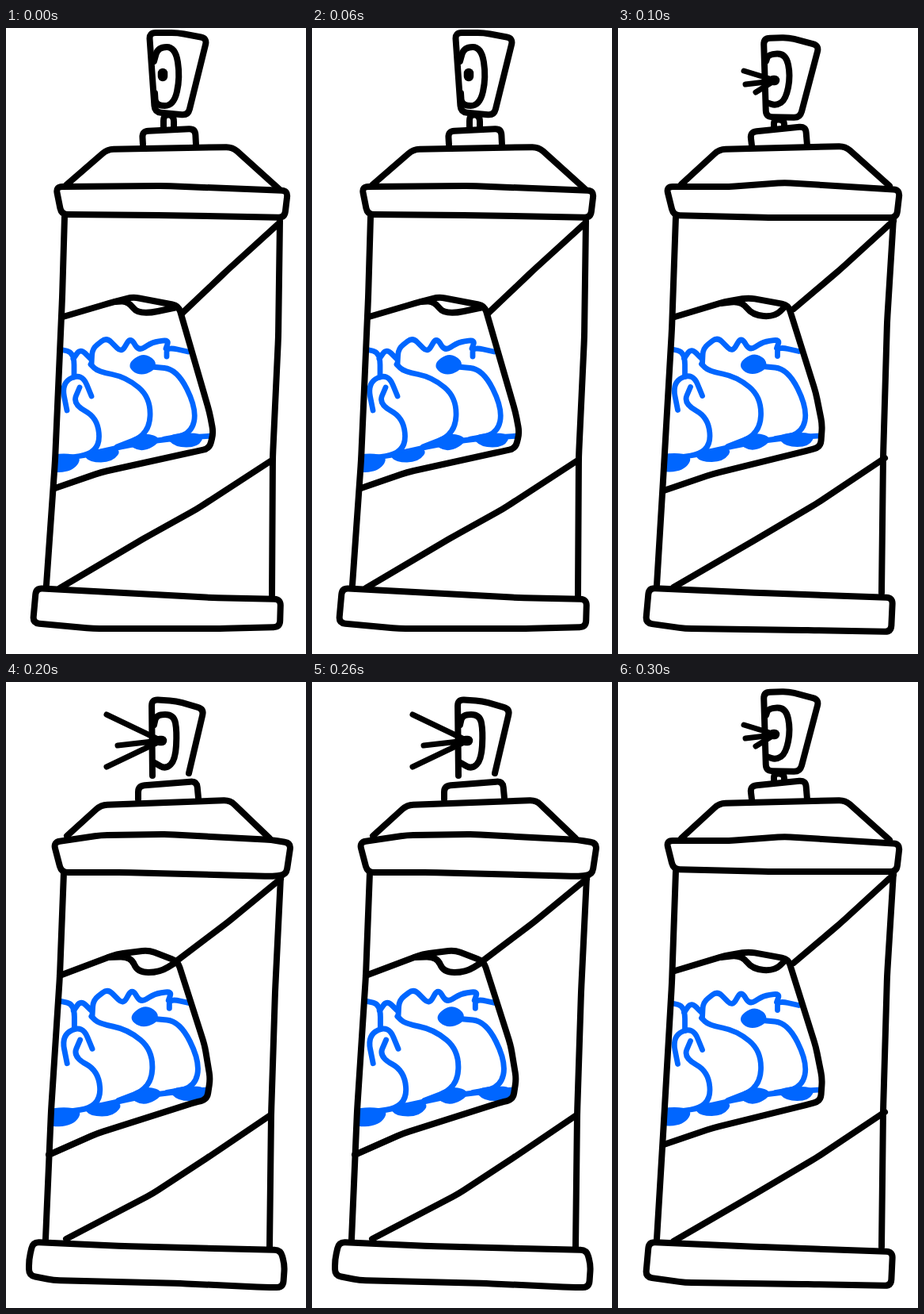
Recreate the animation shown at these times as an HTML page. Size 379x789 px, loop 400 ms.

```html
<!DOCTYPE html>
<html lang="en">
<head>
<meta charset="utf-8">
<title>Spray can</title>
<style>
  html, body { margin: 0; width: 100%; height: 100%; overflow: hidden; background: #fff; }
  svg { display: block; width: 100%; height: 100%; }
  path { stroke-linecap: round; stroke-linejoin: round; }
  .pose { fill: none; stroke: #000; stroke-width: 8; }
  .dot { stroke-width: 12.5; }
  .ray { stroke-width: 7; }
  #art { fill: none; stroke: #06f; stroke-width: 6.8; }
  #art .loop { fill: #06f; stroke-width: 3; }
</style>
</head>
<body>
<svg viewBox="0 0 379 789">
  <clipPath id="window"><path id="opening"/></clipPath>
  <g clip-path="url(#window)">
    <g id="art">
      <path class="soft" data-pts="68,405 86,409 86,440"/>
      <path class="soft" data-pts="85,417 94,404 106,416"/>
      <path data-pts="108,424 109,404 127,390 146,409 157,390 168,407 185,396 206,393 202,404"/>
      <path class="soft" data-pts="203,414 203,402 230,408"/>
      <path class="soft" data-pts="107,424 116,433 152,440 183,466 181,512 140,528"/>
      <path class="soft" data-pts="77,482 70,447 96,435 108,464"/>
      <path class="soft" data-pts="93,453 84,474 117,492 118,536 68,543"/>
      <path class="soft" data-pts="184,427 216,430 241,480 234,512 200,518"/>
      <path class="soft" data-pts="105,537 186,519 262,514"/>
      <path class="soft loop" data-pts="154,425 172,411 188,419 187,431 168,437"/>
      <path class="soft loop" data-pts="50,538 96,538 84,558 50,559"/>
      <path class="soft loop" data-pts="98,535 146,529 134,546 106,546"/>
      <path class="soft loop" data-pts="152,522 175,511 197,519 172,534"/>
      <path class="soft loop" data-pts="202,513 250,511 242,527 214,527"/>
    </g>
  </g>

  <g class="pose" data-art="translate(0)">
    <path class="loop" data-pts="181,6 217,6 254,13 230,110 188,106"/>
    <path class="soft" data-pts="187,42 192,24 214,24 220,62 212,98 189,98 188,82"/>
    <path class="dot" data-pts="198,57 198,61"/>
    <path data-pts="199,126 199,109 212,110 212,126"/>
    <path data-pts="173,147 172,130 239,127 240,147"/>
    <path data-pts="76,198 128,153 286,150 345,203"/>
    <path class="loop" data-pts="63,200 200,199 356,205 352,239 200,236 70,235"/>
    <path data-pts="74,238 71,340 62,545 51,702"/>
    <path data-pts="346,243 344,390 337,540 336,715"/>
    <path data-pts="345,246 280,305 222,360"/>
    <path class="label" data-pts="72,364 130,347 160,339 218,350 257,484 262,510 257,530 238,534 120,560 62,580"/>
    <path class="soft" data-pts="138,345 154,344 168,362 216,352"/>
    <path data-pts="68,706 180,640 240,607 334,546"/>
    <path class="loop" data-pts="38,706 260,718 347,720 346,755 270,757 110,757 34,750"/>
  </g>

  <g class="pose" data-art="translate(-1.5 -.5)">
    <path class="loop" data-pts="184,13 215,12 254,22 230,113 187,112"/>
    <path class="soft" data-pts="187,42 190,33 212,32 218,60 212,90 200,98 188,94"/>
    <path class="dot" data-pts="196,66 198,66"/>
    <path class="ray" d="M159 54L195 65M161 71L195 67M174 81L195 68"/>
    <path data-pts="197,126 197,115 210,116 210,126"/>
    <path data-pts="169,148 167,131 237,124 239,148"/>
    <path data-pts="80,197 128,153 287,149 343,199"/>
    <path class="loop" data-pts="61,200 140,200 210,195 356,204 352,239 190,239 70,236"/>
    <path data-pts="73,238 68,380 57,570 49,702"/>
    <path data-pts="348,240 340,370 335,540 333,712"/>
    <path data-pts="348,243 280,305 222,354"/>
    <path class="label" data-pts="72,364 135,345 165,340 215,349 250,460 258,500 256,528 238,533 120,562 58,583"/>
    <path class="soft" data-pts="130,347 156,344 170,362 198,364 212,350"/>
    <path data-pts="70,705 165,650 250,600 337,542"/>
    <path class="loop" data-pts="39,706 180,712 347,718 345,761 240,759 85,757 35,750"/>
  </g>

  <g class="pose" data-art="matrix(1.025 0 0 1.02 -1.75 -11)">
    <path data-pts="185,118 184,22 215,24 250,34 231,115"/>
    <path class="soft" data-pts="187,54 190,41 212,41 216,62 214,98 202,110 188,102"/>
    <path class="dot" data-pts="194,74 197,74"/>
    <path class="ray" d="M127 41L194 73M141 80L194 74M127 107L194 75"/>
    <path data-pts="167,148 167,131 241,125 243,146"/>
    <path data-pts="77,194 120,155 283,149 333,197"/>
    <path class="loop" data-pts="60,202 120,193 205,192 335,199 360,203 354,243 335,245 150,240 70,240"/>
    <path data-pts="73,240 68,370 57,540 50,702"/>
    <path data-pts="347,246 340,390 335,545 333,712"/>
    <path data-pts="347,248 280,303 215,352"/>
    <path class="label" data-pts="68,370 140,343 180,338 217,352 251,458 258,500 254,526 235,531 115,569 54,596"/>
    <path class="soft" data-pts="130,347 158,346 166,366 194,366 215,353"/>
    <path data-pts="76,702 185,645 260,596 334,546"/>
    <path class="loop" data-pts="34,706 150,711 347,716 352,735 350,763 325,763 220,758 60,754 29,748 29,728"/>
  </g>
</svg>
<script>
// The point up to r away from a towards b, at most halfway.
function toward(a, b, r) {
  const k = Math.min(.5, r / Math.hypot(b[0] - a[0], b[1] - a[1]));
  return a.map((v, i) => v + (b[i] - v) * k);
}

// A polyline whose corners are rounded by radius r.
function roundedPath(points, r, closed) {
  const n = points.length;
  let d = closed ? '' : 'M' + points[0];
  points.forEach((p, i) => {
    if (!closed && (i === 0 || i === n - 1)) return;
    const from = toward(p, points[(i + n - 1) % n], r);
    const to = toward(p, points[(i + 1) % n], r);
    d += `${d ? 'L' : 'M'}${from}Q${p} ${to}`;
  });
  return d + (closed ? 'Z' : 'L' + points[n - 1]);
}

for (const path of document.querySelectorAll('[data-pts]')) {
  const points = path.dataset.pts.split(' ').map(p => p.split(',').map(Number));
  const has = name => path.classList.contains(name);
  path.setAttribute('d', roundedPath(points, has('soft') ? Infinity : 8, has('loop')));
}

const STEP = 100;
const [idle, half, full] = document.querySelectorAll('.pose');
const cycle = [idle, half, full, half];
const art = document.getElementById('art');
const opening = document.getElementById('opening');

function draw(time) {
  const pose = cycle[Math.floor(time / STEP) % cycle.length];
  for (const g of [idle, half, full]) g.style.display = g === pose ? '' : 'none';
  art.setAttribute('transform', pose.dataset.art);
  opening.setAttribute('d', pose.querySelector('.label').getAttribute('d'));
}

const start = performance.now();
function tick() {
  draw(performance.now() - start);
  requestAnimationFrame(tick);
}
tick();
</script>
</body>
</html>
```
